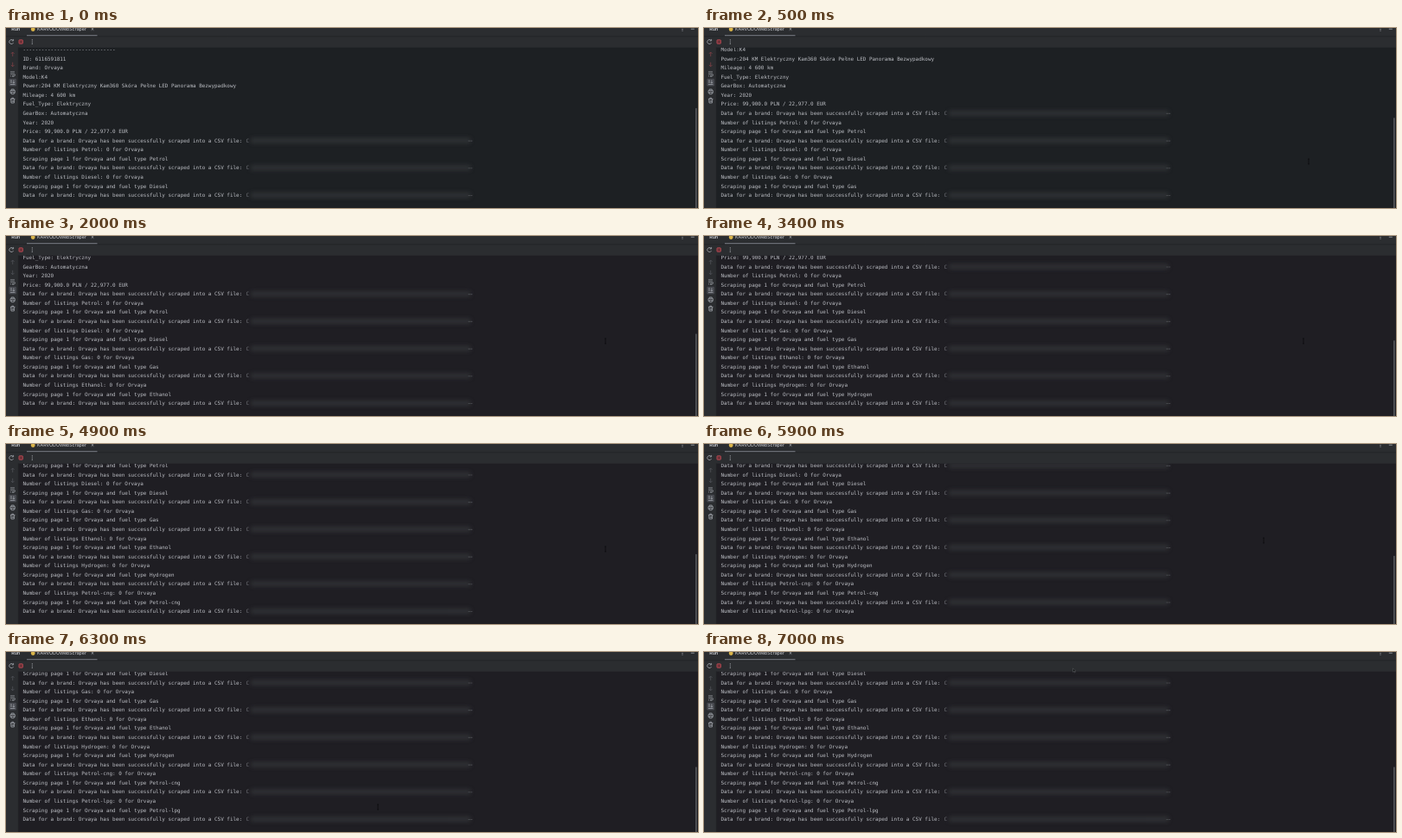
Animation of 800 by 209 pixels, one loop 7.1 s. Source, as an HTML page:

```html
<!DOCTYPE html>
<html lang="en">
<head>
<meta charset="utf-8">
<title>Console log</title>
<style>
  html, body { margin: 0; width: 100%; height: 100%; overflow: hidden; background: #1e1f23; }
  svg { display: block; width: 800px; height: 209px; }
  text { text-rendering: geometricPrecision; white-space: pre; }
  #log { font: 5.955px "DejaVu Sans Mono", monospace; fill: #bcbec4; }
  .ui { font: 5.3px Inter, sans-serif; fill: #ced0d6; }
  .icon { fill: none; stroke: #a4a7ae; stroke-width: .8; }
  #steps { animation: cool 7.1s linear infinite; }
  #tint { animation: tint 7.1s step-end infinite; }
  @keyframes cool {
    0%, 11.267% { stroke: #813f46; animation-timing-function: steps(7, start); }
    19.718%, 100% { stroke: #505258; }
  }
  @keyframes tint { 0% { fill: #1d2023; } 26.76% { fill: #1f1e23; } }
</style>
</head>
<body>
<svg viewBox="0 0 800 209">
  <defs>
    <clipPath id="pane"><rect x="15" y="22.7" width="785" height="187"/></clipPath>
    <filter id="soft" x="-5%" y="-150%" width="110%" height="400%"><feGaussianBlur stdDeviation="2.4"/></filter>
  </defs>
  <rect width="800" height="209" fill="#2b2d30"/>
  <rect id="tint" x="14.6" y="22.7" width="786" height="187"/>
  <path d="M0 9.8H800M14.4 22.7V209" stroke="#1f2023" stroke-width=".7"/>

  <text class="ui" x="6.3" y="3.1" font-weight="600" style="font-weight:600">Run</text>
  <circle cx="31.2" cy="1.6" r="2.4" fill="#d9b44a"/>
  <text class="ui" x="36" y="3.1">KARVODOWebScraper</text>
  <path d="M98.7 0l2.6 2.6m0-2.6l-2.6 2.6M791.8 1.2h4" class="icon" stroke-width=".6"/>
  <path d="M24 8.7H105.5" stroke="#6b6e76" stroke-width="1.3"/>
  <g fill="#b0b3ba">
    <circle cx="782" cy="-.6" r=".55"/><circle cx="782" cy="1.2" r=".55"/><circle cx="782" cy="3" r=".55"/>
    <circle cx="30.3" cy="13.8" r=".6"/><circle cx="30.3" cy="16" r=".6"/><circle cx="30.3" cy="18.2" r=".6"/>
  </g>

  <g class="icon">
    <path d="M8 14.2A2.5 2.5 0 1 0 8.6 17M8.6 12.9v2h-2"/>
    <rect x="15" y="13.8" width="4.4" height="4.4" rx=".6" stroke="#c9505a" fill="#6b3036"/>
    <path id="steps" d="M7.7 33V28m-1.8 1.9l1.8-1.9 1.8 1.9M7.7 39.8v5m-1.8-1.9l1.8 1.9 1.8-1.9"/>
    <path d="M5 51h5M5 53.3h4.2a1.2 1.2 0 0 1 0 2.5H7.5m.9-1.1l-1.1 1.1 1.1 1.1M5 55.8h1"/>
    <rect x="3.3" y="58.8" width="8.8" height="8.8" rx="1.3" fill="#45474d" stroke="none"/>
    <path d="M5 61h2M5 63h2M5 65.6h5.4M8.9 60.4v3.8m-1.3-1.3l1.3 1.3 1.3-1.3"/>
    <path d="M6.2 72.6v-1.5h3v1.5M6.2 75.4H5.1v-2.8h5.2v2.8H9.2M6.2 74.4h3v2.3h-3z"/>
    <path d="M5 82.4h5.4M6.8 82.2v-1h1.8v1M5.7 82.6l.3 4.4h3.4l.3-4.4M7.1 84v1.8M8.3 84v1.8"/>
  </g>

  <g clip-path="url(#pane)"><g id="log"></g></g>
  <rect id="thumb" x="797" width="1.7" fill="#54565b"/>
  <path id="beam" d="M-1-3h2M0-3v6M-1 3h2" fill="none" stroke="#090a0c" stroke-width=".7"/>
  <path id="arrow" d="M0 0v4.2l1-.9.8 1.7.8-.4-.8-1.6h1.3z" fill="#08090a" stroke="#9a9ca1" stroke-width=".3"/>
</svg>
<script>
const LOOP = 7100, PITCH = 10.57, LAST = 196.1;
const $ = id => document.getElementById(id);
const brand = 'Orvaya';
const saved = `Data for a brand: ${brand} has been successfully scraped into a CSV file: `;

const lines = [
  '-'.repeat(30), 'ID: 6116591811', `Brand: ${brand}`, 'Model:K4',
  'Power:204 KM Elektryczny Kam360 Skóra Pełne LED Panorama Bezwypadkowy',
  'Mileage: 4 600 km', 'Fuel_Type: Elektryczny', 'GearBox: Automatyczna',
  'Year: 2020', 'Price: 99,900.0 PLN / 22,977.0 EUR', saved
];
for (const fuel of ['Petrol', 'Diesel', 'Gas', 'Ethanol', 'Hydrogen', 'Petrol-cng', 'Petrol-lpg'])
  lines.push(`Number of listings ${fuel}: 0 for ${brand}`,
             `Scraping page 1 for ${brand} and fuel type ${fuel}`, saved);

// Blurred file path after each "saved" line
const hidden = y => `
  <text x="277.4" y="${y}" fill="#777980">C</text>
  <rect x="283" y="${y - 5}" width="254" height="6" fill="#3b3c41" opacity=".62" filter="url(#soft)"/>
  <path d="M534.5 ${y - 1.6}h4.6" stroke="#686a70" stroke-width="1.1" stroke-dasharray="1.2 .6" opacity=".6"/>`;

$('log').innerHTML = lines.map((line, i) => {
  const y = +(i * PITCH).toFixed(2);
  return `<g><text x="19.4" y="${y}">${line}</text>${line === saved ? hidden(y) : ''}</g>`;
}).join('');
const rows = [...$('log').children];

// [time, lines printed]
const prints = [[0, 17], [300, 18], [400, 19], [500, 20], [1900, 22], [2000, 23],
  [3400, 26], [4900, 29], [5900, 30], [6000, 31], [6300, 32]];
// [time, x, y]
const beams = [[0, -20, 0], [500, 699, 155], [1900, 693, 122], [5900, 647, 112],
  [6300, 430, 180], [6700, 429, 135], [6800, 428, 85], [6900, 427, 42], [7000, -20, 0]];
const at = (keys, t) => keys.findLast(k => k[0] <= t);

let shown = 0;
function draw(now) {
  const t = now % LOOP;
  const n = at(prints, t)[1];
  if (n !== shown) {
    shown = n;
    rows.forEach((row, i) => row.style.display = i < n ? '' : 'none');
    $('log').setAttribute('transform', `translate(0 ${LAST - (n - 1) * PITCH})`);
    const height = 3243 / (n + 11);
    $('thumb').setAttribute('y', 209 - height);
    $('thumb').setAttribute('height', height);
  }
  const [, x, y] = at(beams, t);
  $('beam').setAttribute('transform', `translate(${x} ${y})`);
  $('arrow').setAttribute('transform', `translate(${t >= 7000 ? 426.5 : -20} 19)`);
  requestAnimationFrame(draw);
}
draw(performance.now());
</script>
</body>
</html>
```
